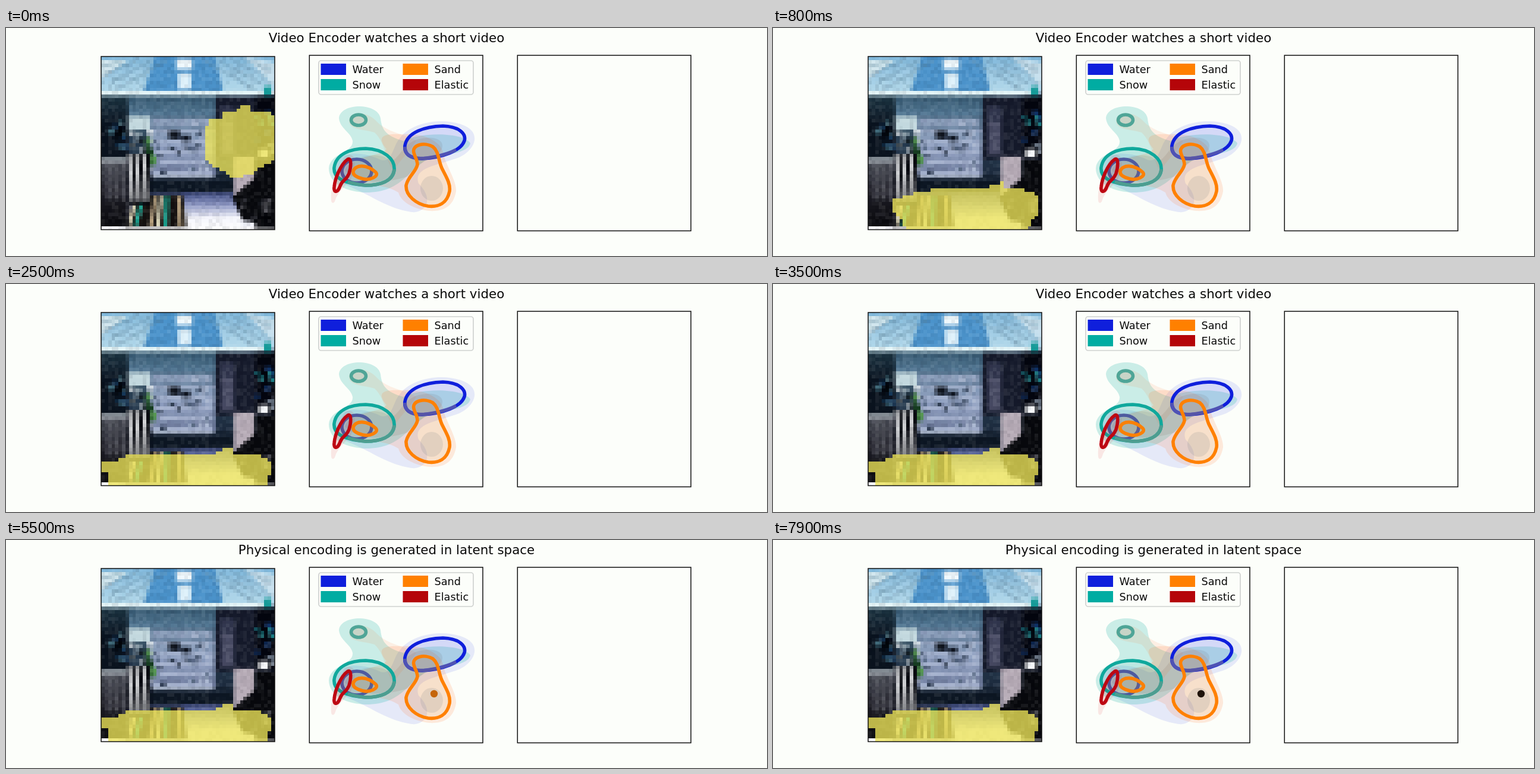
An HTML page with a canvas for the animation above (8000 ms loop, 1280 by 384 pixels).

```html
<!DOCTYPE html>
<html lang="en">
<head>
<meta charset="utf-8">
<title>Video Encoder</title>
<style>
html, body { margin: 0; width: 100%; height: 100%; overflow: hidden; background: #fcfefa; }
#stage { position: relative; width: 1280px; height: 384px; }
svg { position: absolute; left: 0; top: 0; }
canvas { position: absolute; left: 160px; top: 48px; width: 292px; height: 292px; image-rendering: pixelated; }
text { font: 17.7px "DejaVu Sans", sans-serif; fill: #0a0a0a; }
#title { font-size: 21.4px; text-anchor: middle; }
.box { fill: none; stroke: #111; stroke-width: 1.5; }
.line { stroke-width: 5.6; stroke-linejoin: round; fill-opacity: .08; }
</style>
</head>
<body>
<div id="stage">
<canvas id="photo" width="50" height="50"></canvas>
<svg width="1280" height="384" viewBox="0 0 1280 384">
  <text id="title" x="640" y="24"></text>
  <rect class="box" x="160" y="48" width="292" height="291.6"/>
  <rect class="box" x="510.3" y="46" width="291.7" height="295.6"/>
  <rect class="box" x="860.3" y="46" width="291.7" height="295.6"/>

  <!-- Soft density regions -->
  <path fill="#2030e0" opacity=".1" d="M550 236C556 208 595 205 630 222C650 228 650 200 662 186C680 160 730 150 765 162C802 174 790 205 762 218C724 232 684 235 694 262C722 290 704 312 682 310C640 303 620 285 580 268C560 260 548 250 550 236Z"/>
  <path fill="#00a99d" opacity=".2" d="M560 152C562 126 625 125 630 152C632 172 640 182 668 190C700 174 770 176 781 194C778 212 735 212 704 224C676 240 665 277 605 277C560 275 543 255 543 236C545 210 585 210 583 190C580 175 562 170 560 152Z"/>
  <path fill="#ff6a20" opacity=".14" d="M575 240C580 215 625 218 640 204C620 180 640 178 665 179C700 176 735 190 736 215C745 240 758 260 757 275C752 305 730 309 712 308C690 306 665 295 660 277C640 265 625 266 600 264C580 262 572 252 575 240Z"/>
  <path fill="#e02020" opacity=".1" d="M547 290C545 270 555 240 570 216C592 205 588 235 580 255C570 268 558 275 553 292C550 297 547 294 547 290Z"/>
  <path fill="#ff6a20" opacity=".1" d="M577 155C580 140 606 140 622 156C640 176 670 178 690 190C676 212 660 226 652 240C640 230 640 195 620 176C600 170 576 172 577 155Z"/>
  <path fill="#604838" opacity=".1" d="M570 240C580 215 632 205 646 225C664 220 668 190 700 186C730 180 745 196 725 214C700 224 690 235 676 250C640 262 590 264 570 240Z"/>
  <ellipse cx="716" cy="270" rx="19" ry="21" fill="#607080" opacity=".14"/>

  <!-- Main contours -->
  <g class="line">
    <path stroke="#0f1fdc" fill="#0f1fdc" d="M671 198C675 175 705 166 735 165C765 166 774 180 771 190C765 207 735 218 700 220C680 220 669 212 671 198Z"/>
    <path stroke="#4f52b4" fill="none" d="M671 200C671 219 689 221 708 219C729 216 746 211 757 205"/>
    <ellipse stroke="#54549f" fill="#54549f" cx="590" cy="241" rx="25" ry="20"/>
    <path stroke="#10a89c" fill="#10a89c" d="M552 235C555 212 580 203 605 203C635 204 655 220 653 240C650 258 630 265 605 265C575 263 550 255 552 235Z"/>
    <path stroke="#4d9d90" fill="none" d="M653 238C651 258 630 265 605 265C594 264 584 262 575 259"/>
    <ellipse stroke="#4fa597" fill="#805040" cx="593" cy="155" rx="12.5" ry="9"/>
    <path stroke="#fa8006" fill="#ff8000" d="M584 241C588 229 608 230 622 243C628 250 612 257 600 254C588 251 583 247 584 241Z"/>
    <path stroke="#ff8000" fill="#b07010" d="M686 210C682 196 705 192 718 200C728 208 727 222 733 236C740 250 748 262 746 275C742 295 728 302 710 300C690 297 672 282 673 265C676 250 690 242 692 230C692 222 687 216 686 210Z"/>
    <path stroke="#bd0712" fill="#bd0712" d="M575 221C581 218 581 232 577 245C572 258 566 255 562 266C558 278 551 278 552 268C553 255 562 230 575 221Z"/>
  </g>
  <circle id="dot" cx="720" cy="259" r="6.2"/>

  <rect x="526" y="55" width="260" height="57" rx="4" fill="#fcfefa" stroke="#d0d2d0" stroke-width="1.7"/>
  <rect x="529.5" y="60" width="42.5" height="19" fill="#0f1fdc"/><text x="582.5" y="75.6">Water</text>
  <rect x="529.5" y="86" width="42.5" height="19" fill="#00aca2"/><text x="582.5" y="101.6">Snow</text>
  <rect x="667.5" y="60" width="42.5" height="19" fill="#ff8000"/><text x="720.5" y="75.6">Sand</text>
  <rect x="667.5" y="86" width="42.5" height="19" fill="#b50509"/><text x="720.5" y="101.6">Elastic</text>
</svg>
</div>
<script>
const LOOP = 8000, CELLS = 50, CELL = 292 / CELLS, LEFT = 160, TOP = 48;
const ENCODE = 4400, PULSE = 3200, LAND = 0.42, SETTLE = 0.75;
const title = document.getElementById("title"), dot = document.getElementById("dot");
const view = document.getElementById("photo").getContext("2d");
const room = document.createElement("canvas");
room.width = room.height = CELLS;
const pen = room.getContext("2d");

let seed = 7;
const random = () => (seed = (seed * 16807) % 2147483647) / 2147483647;

function rect(color, x, y, w, h) {
  pen.fillStyle = color;
  pen.fillRect(x, y, w, h);
}
function shade(x, y, w, h, ...colors) {
  const g = pen.createLinearGradient(0, y, 0, y + h);
  colors.forEach((c, i) => g.addColorStop(i / (colors.length - 1), c));
  rect(g, x, y, w, h);
}
function shape(color, ...points) {
  pen.fillStyle = color;
  pen.beginPath();
  for (let i = 0; i < points.length; i += 2) pen.lineTo(points[i], points[i + 1]);
  pen.fill();
}
function line(color, width, x1, y1, x2, y2) {
  pen.strokeStyle = color;
  pen.lineWidth = width;
  pen.beginPath();
  pen.moveTo(x1, y1);
  pen.lineTo(x2, y2);
  pen.stroke();
}
function speckle(count, x, y, w, h, ...colors) {
  for (let i = 0; i < count; i++)
    rect(colors[i % colors.length], x + random() * w, y + random() * h, 5 + random() * 7, 4 + random() * 6);
}

function paintRoom() {
  pen.scale(1 / CELL, 1 / CELL);
  pen.translate(-LEFT, -TOP);

  // Ceiling
  shade(160, 48, 292, 60, "#7fb8dc", "#9ccae4", "#b2d8ea");
  shape("#4c94cc", 250, 48, 350, 48, 366, 107, 232, 107);
  shape("#d0e6ee", 160, 54, 205, 54, 160, 86);
  shape("#c6e0ee", 452, 58, 400, 48, 452, 98);
  for (let i = 0; i < 4; i++) {
    line("#5c8499", 2, 270 - i * 24, 54, 190 - i * 14, 102 - i * 11);
    line("#668ca3", 2, 332 + i * 24, 54, 420 + i * 9, 104 - i * 11);
  }
  rect("#f2fbff", 287, 52, 26, 17);
  rect("#dff2fb", 290, 76, 21, 27);

  // Back wall and shelves
  shade(160, 114, 292, 140, "#3a5f7a", "#2a4156", "#1d2b3e");
  shade(160, 114, 46, 107, "#1d3644", "#08101c", "#0c1520");
  shade(206, 114, 150, 36, "#33566e", "#587d9a");
  rect("#e4f4f8", 160, 107, 276, 7);
  rect("#159a98", 434, 98, 12, 18);
  shade(240, 150, 112, 100, "#64809c", "#8e9fc0", "#6f7c9e");
  for (let y = 156; y < 246; y += 17) rect("#a9b6d2", 246, y, 100, 5);
  speckle(36, 240, 152, 104, 90, "#a9b6d0", "#465873", "#8f9ebd", "#2f3c52");
  rect("#070c16", 274, 173, 18, 14);
  rect("#0b111c", 296, 181, 13, 9);
  rect("#c2d8de", 205, 149, 37, 22);
  speckle(12, 164, 155, 34, 46, "#173a5c", "#010308", "#45707f");
  speckle(14, 202, 171, 36, 34, "#f0f5f5", "#0d161c", "#c0cfd4");
  speckle(12, 230, 182, 14, 44, "#3f8a3c", "#163e20", "#62a45c");

  // Cabinets on the right
  rect("#161b2c", 352, 116, 100, 106);
  rect("#32374f", 360, 132, 25, 82);
  rect("#474a63", 364, 158, 18, 55);
  rect("#04060f", 420, 116, 32, 104);
  speckle(14, 418, 138, 30, 78, "#12366f", "#1d8088", "#03050e", "#8d9cac");

  // Floor and rug
  shade(160, 250, 292, 90, "#0c1622", "#46537c", "#c9cee8", "#ffffff");
  rect("#0d1724", 242, 258, 142, 20);
  rect("#a3b0c4", 246, 247, 104, 6);
  shade(296, 278, 100, 62, "#3f4c82", "#8f99c4", "#f4f5fc", "#ffffff");
  shape("#1c1815", 216, 282, 298, 282, 304, 335, 200, 335);
  for (let i = 0; i < 8; i++)
    line(["#e2ddc0", "#1cb09c", "#14100f", "#bca582"][i % 4], 6, 221 + i * 10, 283, 206 + i * 12.5, 334);

  // Furniture
  shade(160, 220, 46, 114, "#4a4e58", "#1f1f27", "#08080c");
  rect("#c0c8ce", 160, 220, 45, 6);
  for (let x = 170; x < 206; x += 12) rect("#5a5c64", x, 230, 5, 60);
  rect("#080a10", 205, 212, 38, 86);
  for (let x = 208; x < 242; x += 12) line("#f2f4f6", 5, x, 212, x + 4, 292);
  rect("#b8adb8", 383, 217, 36, 68);
  rect("#07080c", 419, 222, 33, 116);
  shape("#08090d", 380, 285, 420, 252, 452, 240, 452, 336, 398, 324);
  speckle(12, 386, 285, 56, 38, "#66666c", "#020306", "#2a2b32");
  rect("#f4f6f8", 425, 204, 17, 14);

  // Coarse video texture
  pen.resetTransform();
  for (let i = 0; i < CELLS * CELLS; i++) {
    const v = random() - 0.5;
    pen.fillStyle = `rgba(${v > 0 ? "255,255,255" : "0,5,20"},${Math.abs(v) * 0.16})`;
    pen.fillRect(i % CELLS, Math.floor(i / CELLS), 1, 1);
  }
}

const lump = [[333,215],[333,178],[345,152],[362,152],[362,142],[392,138],[392,130],[410,130],[410,142],
  [430,142],[452,145],[452,180],[452,222],[428,236],[410,246],[385,255],[373,246],[346,233]];
const pile = [[160,314],[160,298],[188,298],[206,288],[262,286],[352,288],[354,280],[380,276],[382,288],
  [414,286],[438,294],[446,306],[446,322],[438,322],[438,340],[300,340],[173,340],[173,320]];

// Free fall, then spreading over the floor
function sandPath(t) {
  const drop = 466 * Math.min(t, LAND) ** 2;
  const u = Math.min(1, Math.max(0, (t - LAND) / SETTLE));
  const spread = 1 - (1 - u) ** 2;
  const path = new Path2D();
  lump.forEach(([x, y], i) => {
    const [px, py] = pile[i];
    path.lineTo(x + (px - x) * spread, y + drop + (py - y - drop) * spread);
  });
  return path;
}

function draw(ms) {
  const path = sandPath(ms / 1000);
  view.drawImage(room, 0, 0);
  view.fillStyle = "rgba(236,228,88,.79)";
  for (let y = 0; y < CELLS; y++)
    for (let x = 0; x < CELLS; x++)
      if (view.isPointInPath(path, LEFT + (x + 0.5) * CELL, TOP + (y + 0.5) * CELL))
        view.fillRect(x, y, 1, 1);

  const encoding = ms >= ENCODE;
  title.textContent = encoding
    ? "Physical encoding is generated in latent space"
    : "Video Encoder watches a short video";
  dot.style.display = encoding ? "" : "none";
  const glow = (1 - Math.cos((ms - ENCODE) / PULSE * 2 * Math.PI)) / 2;
  dot.setAttribute("fill", `rgb(${12 + 238 * glow},${10 + 117 * glow},10)`);
}

paintRoom();
const start = performance.now();
function tick() {
  const ms = (performance.now() - start) % LOOP;
  draw(Math.floor(ms / 100) * 100);
  requestAnimationFrame(tick);
}
tick();
</script>
</body>
</html>
```
